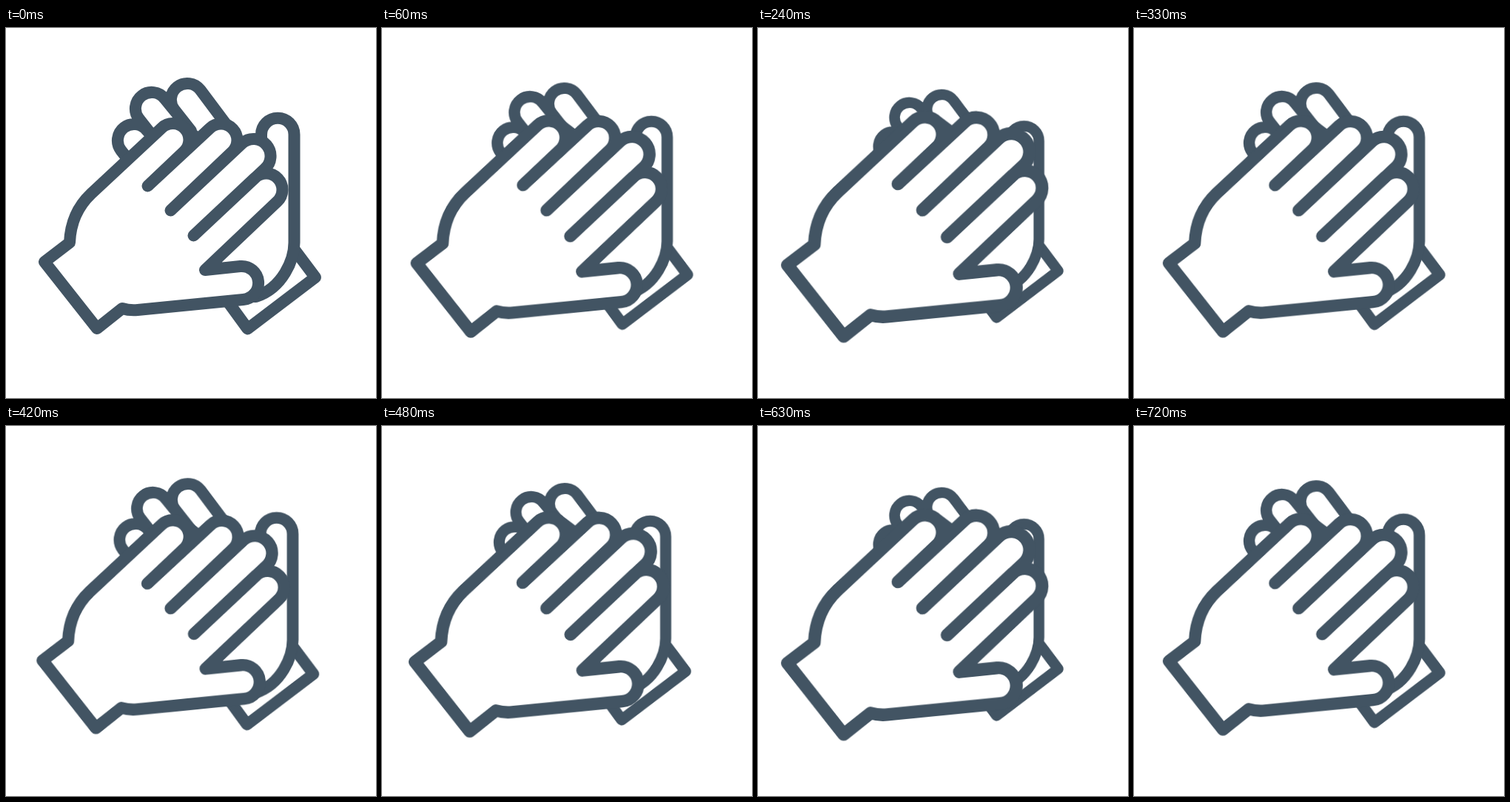
Write an HTML page without scripts that moves like this. It is 500 by 500 pixels and loops after 0.75 s.

```html
<!DOCTYPE html>
<html lang="en">
<head>
<meta charset="utf-8">
<title>Clapping hands</title>
<style>
  html, body {
    margin: 0;
    width: 100%;
    height: 100%;
    overflow: hidden;
    background: #fff;
  }
  svg {
    display: block;
    width: 100%;
    height: 100%;
    fill: #fff;
    stroke: #425463;
    stroke-width: 16;
    stroke-linecap: round;
    stroke-linejoin: round;
  }
  /* --gain is the size change of a hand at unit clap depth */
  .hand { animation: clap 750ms infinite; }
  .front { --gain: .07; transform-origin: 226px 253px; }
  .back { --gain: -.09; transform-origin: 281px 240px; }

  /* Two claps; the second is cut short by the loop */
  @keyframes clap {
    0%, 52% {
      transform: scale(1);
      animation-timing-function: steps(6);
    }
    24%, 76% {
      transform: scale(calc(1 + 1.26 * var(--gain)));
      animation-timing-function: step-end;
    }
    28% {
      transform: scale(calc(1 + 1.21 * var(--gain)));
      animation-timing-function: steps(6);
    }
    80% {
      transform: scale(calc(1 + 1.21 * var(--gain)));
      animation-timing-function: steps(5);
    }
    100% { transform: scale(calc(1 + .2 * var(--gain))); }
  }
</style>
</head>
<body>
<svg viewBox="0 0 500 500">
  <g class="hand back">
    <path d="M388 297L418 337L326.5 406.5L297 366Z"/>
    <path d="M338 363C374 351 389.5 313 389.5 290V144A22 22 0 0 0 345 144V200L322 163
      L262.5 83.5A22 22 0 0 0 227.5 110.5L250 139
      L214.5 95.5A22 22 0 0 0 179.5 122.5L205 155
      L190.5 138.5A22 22 0 0 0 155.5 165.5L200 222L300 362Z"/>
  </g>
  <!-- Arc radii just under half the chord give exact semicircles -->
  <path class="hand front" d="M86 290L52 316L123 406L157 379Q167 382 178 381
    L320.5 367A22 22 0 0 0 316.5 322L269 327
    L366.5 234.5A21 21 0 0 0 336.5 202.5L253.5 280.5
    L349.5 190.5A21 21 0 0 0 319.5 155.5L222.5 246.5
    L305.5 167.5A21 21 0 0 0 275.5 135.5L191.5 213.5
    L240.5 167A21 21 0 0 0 210.5 135L115 224C96 242 87 265 86 290ZM238 133L259 149"/>
</svg>
</body>
</html>
```
